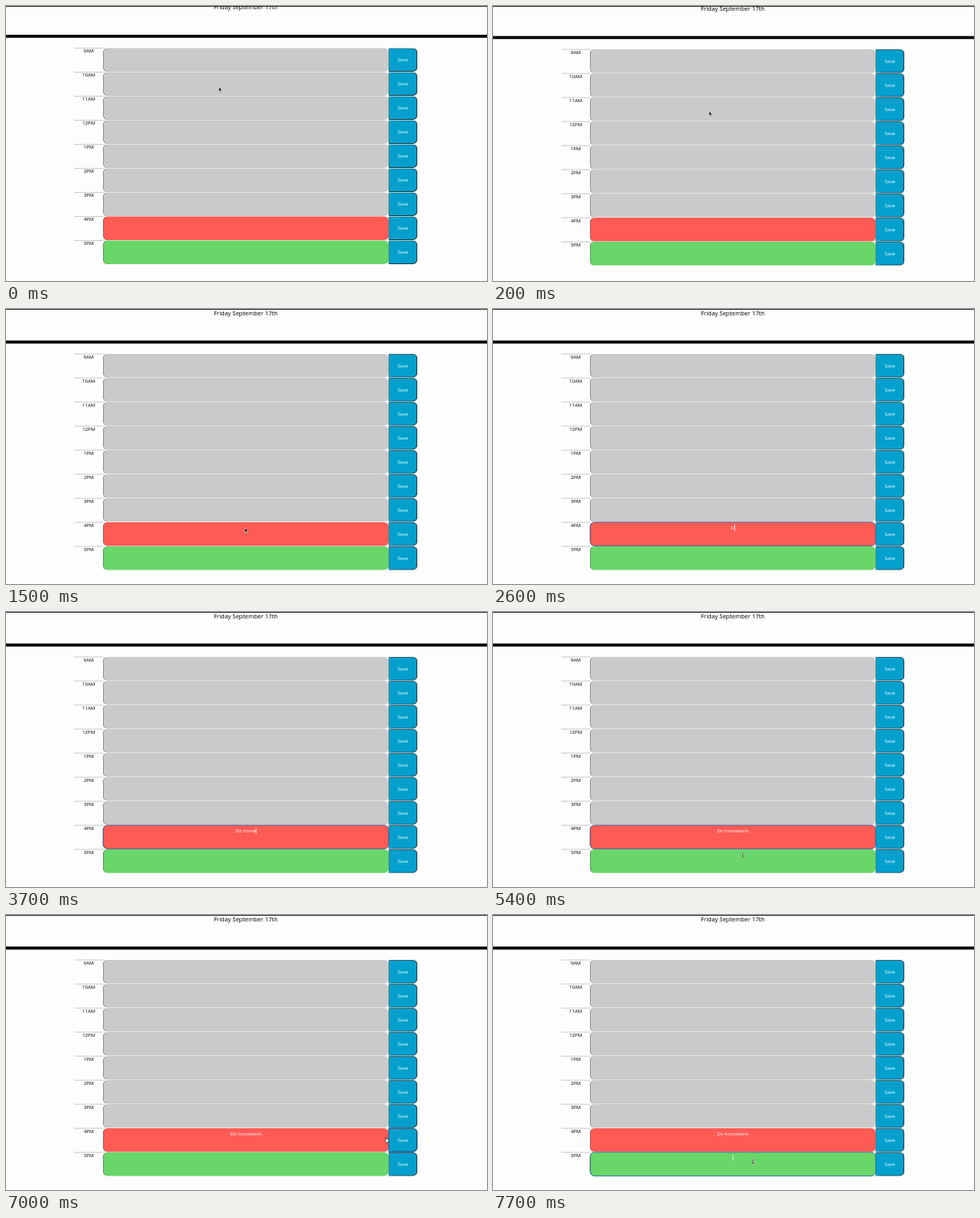
An HTML page that plays this animation: 600x343 px, repeating every 8000 ms.

```html
<!DOCTYPE html>
<html lang="en">
<head>
<meta charset="utf-8">
<title>Day planner</title>
<style>
  html, body { margin: 0; width: 100%; height: 100%; overflow: hidden; background: #fdfdfd; }
  #stage { position: absolute; left: 0; top: 0; width: 600px; height: 343px; overflow: hidden; }
  /* The page is laid out at 1600px and shown at 3/8 size. */
  #page { position: absolute; width: 1595px; height: 915px; transform-origin: 0 0;
          font: 16px/1 "Open Sans", sans-serif; color: #000; text-align: center; }
  #page * { box-sizing: border-box; }
  #date { position: absolute; top: 3px; width: 100%; font-size: 20px; }
  #bar { position: absolute; top: 105px; width: 1600px; height: 10px; background: #000; }
  #edge { position: absolute; top: 0; width: 600px; height: .8px; background: #333; }
  #rows { position: absolute; left: 227.5px; top: 148px; width: 1140px; }
  .row { display: flex; height: 80px; border-top: 1px solid #fff; }
  .hour { width: 95px; border-top: 1px dashed #000; }
  .note { width: 950px; padding: 10px; border-left: 1px solid #000; border-radius: 15px;
          color: #fff; white-space: pre-wrap; background: #cacaca; }
  .now { background: #ff5b55; }
  .next { background: #69d669; }
  .save { width: 95px; line-height: 75px; color: #fff; background: #04a0cd;
          border: 2px solid #111; border-top-color: #444; border-radius: 0 15px 15px 0; }
  .focus { outline: 2px solid #15539e; outline-offset: -1px; position: relative; }
  .caret { display: inline-block; width: 2px; height: 16px; margin: 0 -1px;
           vertical-align: top; background: #fff; transform: scaleY(1.3); }
  svg { position: absolute; left: 0; top: 0; }
</style>
</head>
<body>
<div id="stage">
  <div id="page">
    <div id="date">Friday September 17th</div>
    <div id="bar"></div>
    <div id="rows"></div>
  </div>
  <div id="edge"></div>
  <svg width="600" height="343">
    <g id="pointer" stroke-linejoin="round">
      <path id="arrow" d="M0 0V5.7L1.3 4.5L2.2 6.6L3.2 6.2L2.3 4.1H4Z" fill="#000" stroke="#fff" stroke-width=".5"/>
      <g id="beam" fill="none">
        <path d="M-1.2 -3Q0 -3 0 -2V2Q0 3 -1.2 3M1.2 -3Q0 -3 0 -2M0 2Q0 3 1.2 3M-.7 .8H.7" stroke="#fff" stroke-width="1.5"/>
        <path d="M-1.2 -3Q0 -3 0 -2V2Q0 3 -1.2 3M1.2 -3Q0 -3 0 -2M0 2Q0 3 1.2 3M-.7 .8H.7" stroke="#111" stroke-width=".7"/>
      </g>
      <path id="hand" d="M-1.2 .5V-3Q-.7 -3.8 -.2 -3V-.8Q.4 -1.3 .8 -.6Q1.4 -1 1.7 -.3Q2.5 -.5 2.5 .4Q2.5 2 1.7 3.4H-.9Q-1.3 2.3 -2.6 .6Q-2.3 -.4 -1.2 .5Z" fill="#fff" stroke="#111" stroke-width=".6"/>
    </g>
  </svg>
</div>
<script>
const $ = id => document.getElementById(id);
const LOOP = 8000, STEP = 100;
const TASK = "Do homework";
const KEY_TIMES = [2600, 2800, 3000, 3200, 3400, 3500, 3700, 4000, 4100, 4200, 4300];
const FOCUS_TASK = 2000, FOCUS_SAVE = 6800, FOCUS_NEXT = 7600;

const scroll = [[0, -3.5], [100, -3.2], [200, -1.9], [300, -.9], [400, -.35], [900, 0]];
const path = [
  [0, 265.5, 101], [100, 267, 112], [400, 274.5, 169.5], [900, 289, 238], [1500, 298, 273],
  [1700, 298, 273], [1900, 304, 276], [4500, 304, 276], [5300, 311.5, 303.5],
  [6000, 311.5, 303.5], [6600, 482, 282], [6800, 482, 281], [7000, 475, 280.3],
  [7400, 324, 308]
];

$("rows").innerHTML = ["9AM", "10AM", "11AM", "12PM", "1PM", "2PM", "3PM", "4PM", "5PM"]
  .map((hour, i) => `<div class="row"><div class="hour">${hour}</div>` +
    `<div class="note ${["now", "next"][i - 7] || ""}"></div><div class="save">Save</div></div>`)
  .join("");
const task = document.querySelector(".now");
const next = document.querySelector(".next");
const saveTask = task.nextElementSibling;

// Linear interpolation through rows of [time, ...values].
function sample(keys, t) {
  const i = keys.findIndex(k => k[0] > t);
  if (i < 0) return keys[keys.length - 1].slice(1);
  const [a, b] = [keys[i - 1], keys[i]];
  const u = (t - a[0]) / (b[0] - a[0]);
  return a.slice(1).map((v, j) => v + (b[j + 1] - v) * u);
}

function setNote(note, text, focused, caretOn) {
  note.classList.toggle("focus", focused);
  note.innerHTML = text + (focused && caretOn ? '<span class="caret"></span>' : "");
}

function pointerShape(t) {
  if (t >= KEY_TIMES[0] && t < 4500) return "";
  if (t >= 6600 && t <= 7000) return "hand";
  return t < 1900 ? "arrow" : "beam";
}

function draw(t) {
  const [shift] = sample(scroll, t);
  $("page").style.transform = `translateY(${shift}px) scale(.375)`;

  const typed = KEY_TIMES.filter(k => k <= t).length;
  const inTask = t >= FOCUS_TASK && t < FOCUS_SAVE;
  const inNext = t >= FOCUS_NEXT;
  const lastInput = inNext ? FOCUS_NEXT : typed ? KEY_TIMES[typed - 1] : FOCUS_TASK;
  const caretOn = Math.floor(Math.max(0, t - lastInput - 200) / 500) % 2 === 0;
  setNote(task, TASK.slice(0, typed), inTask, caretOn);
  setNote(next, "", inNext, caretOn);
  saveTask.classList.toggle("focus", t >= FOCUS_SAVE && t < FOCUS_NEXT);

  const [x, y] = sample(path, t);
  $("pointer").setAttribute("transform", `translate(${x} ${y})`);
  for (const shape of ["arrow", "beam", "hand"])
    $(shape).style.display = shape === pointerShape(t) ? "" : "none";
}

const start = performance.now();
function frame() {
  const t = (performance.now() - start) % LOOP;
  draw(Math.floor(t / STEP) * STEP);
  requestAnimationFrame(frame);
}
frame();
</script>
</body>
</html>
```
